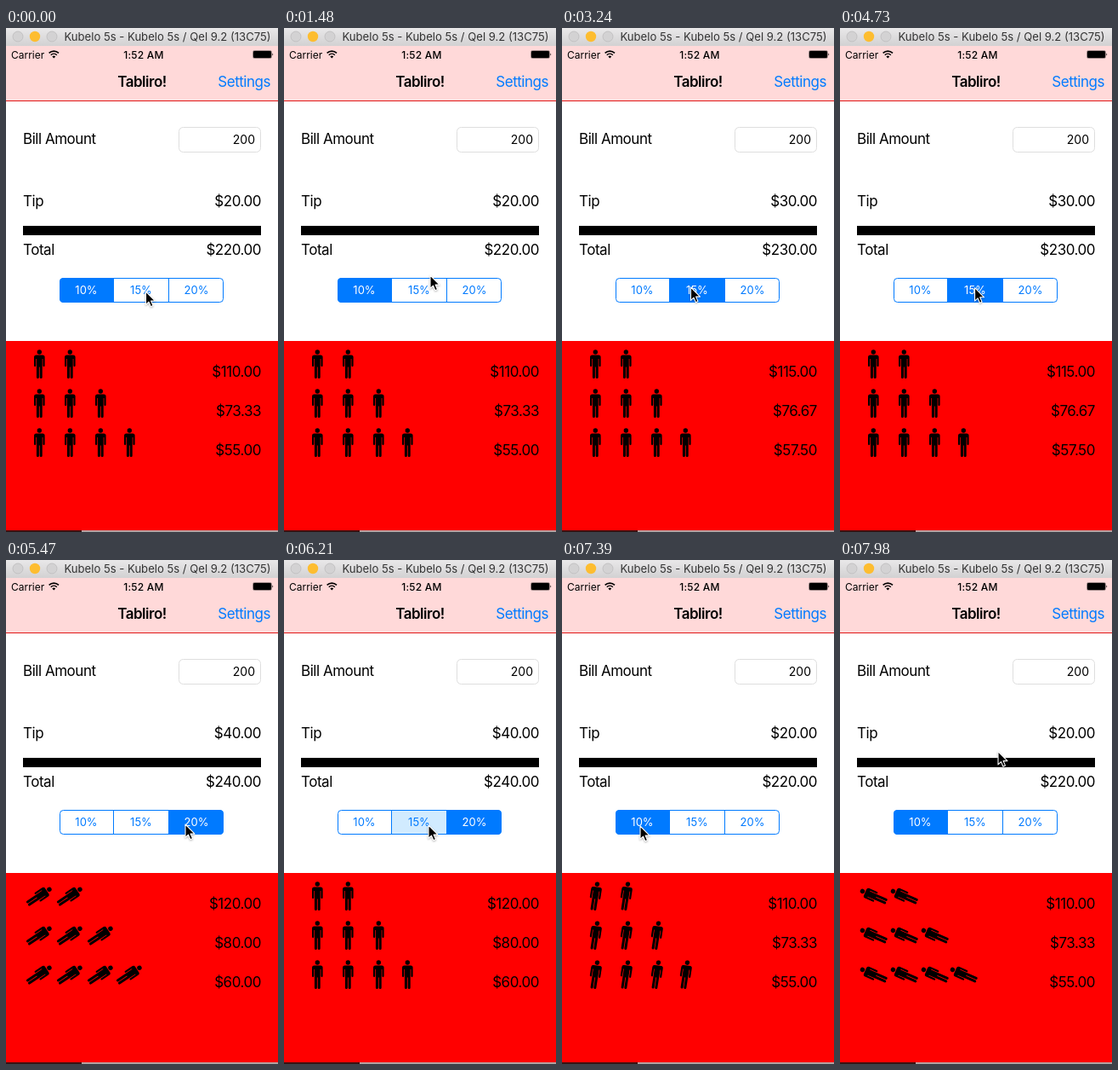
An HTML page for the animation above (8 s loop, 320 px wide and 591 px high).

```html
<!DOCTYPE html>
<html lang="en">
<head>
<meta charset="utf-8">
<title>Tip calculator</title>
<style>
html, body { margin: 0; width: 100%; height: 100%; overflow: hidden; background: #fff; }
svg { display: block; width: 100%; height: 100%; font-family: Inter, Roboto, sans-serif; }
.label { font-size: 17px; letter-spacing: -.47px; }
.seg { font-size: 13px; text-anchor: middle; }
.end { text-anchor: end; }
.mid { text-anchor: middle; }
#cursor { filter: drop-shadow(0 1px 1px rgba(0, 0, 0, .3)); }
</style>
</head>
<body>
<svg viewBox="0 0 320 591">
  <defs>
    <linearGradient id="chrome" x2="0" y2="1">
      <stop stop-color="#e9e8e9"/><stop offset="1" stop-color="#d2d1d2"/>
    </linearGradient>
    <clipPath id="pill"><rect x="63" y="293" width="193" height="29" rx="4.5"/></clipPath>
    <g id="person">
      <circle cy="-14" r="2.7"/>
      <path d="M-3.8-10.6H3.8Q6.3-10.6 6.3-8V1.8Q6.3 3.2 5.2 3.2T4.1 1.8V-6H3.4V15.4Q3.4 17 1.9 17T.4 15.4V3.4H-.4V15.4Q-.4 17-1.9 17T-3.4 15.4V-6H-4.1V1.8Q-4.1 3.2-5.2 3.2T-6.3 1.8V-8Q-6.3-10.6-3.8-10.6Z"/>
    </g>
  </defs>

  <rect width="320" height="591" fill="#fff"/>
  <rect width="320" height="21" fill="url(#chrome)"/>
  <circle cx="14" cy="10" r="6" fill="#d3d2d3" stroke="#bdbcbd" stroke-width=".8"/>
  <circle cx="34" cy="10" r="6.2" fill="#fdbd30"/>
  <circle cx="54" cy="10" r="6" fill="#d3d2d3" stroke="#bdbcbd" stroke-width=".8"/>
  <text x="68.5" y="15" font-size="13.1" fill="#333">Kubelo 5s - Kubelo 5s / Qel 9.2 (13C75)</text>

  <rect y="21" width="320" height="64" fill="#ffd9d9"/>
  <rect y="85" width="320" height="1" fill="#e01818"/>
  <text x="6" y="35.5" font-size="12">Carrier</text>
  <g fill="none" stroke="#000" stroke-width="1.6">
    <path d="M50.6 29.4a8.2 8.2 0 0 1 11.4 0M52.8 31.7a5 5 0 0 1 7 0"/>
    <path d="M56.3 35.5l-1.9-2a2.8 2.8 0 0 1 3.8 0z" fill="#000" stroke="none"/>
  </g>
  <text x="162" y="35.5" font-size="12" font-weight="500" letter-spacing=".2" class="mid">1:52 AM</text>
  <rect x="290.5" y="26.5" width="22" height="9" rx="1.8" fill="none" stroke="#8a7676" stroke-width=".8"/>
  <rect x="291" y="27" width="21" height="8" rx="1"/>
  <path d="M313.4 29.5q1.8 1.5 0 3z"/>
  <text x="160" y="69" class="label mid" font-weight="600">Tabliro!</text>
  <text x="311" y="69" class="label end" fill="#007aff">Settings</text>

  <text x="20" y="136" class="label">Bill Amount</text>
  <rect x="203.5" y="116.5" width="96" height="29" rx="5" fill="#fff" stroke="#dedede"/>
  <text x="293" y="136" font-size="14" class="end">200</text>
  <text x="20" y="209" class="label">Tip</text>
  <text x="300" y="209" class="label end" id="tip"></text>
  <rect x="20" y="232" width="280" height="11"/>
  <text x="20" y="265.5" class="label">Total</text>
  <text x="300" y="265.5" class="label end" id="total"></text>

  <g id="segments" clip-path="url(#pill)"></g>
  <path d="M126.5 293V322M191.5 293V322" stroke="#007aff"/>
  <rect x="63.5" y="293.5" width="192" height="28" rx="4" fill="none" stroke="#007aff"/>
  <g id="names"></g>

  <rect y="367" width="320" height="222" fill="#f00"/>
  <rect y="589" width="320" height="2" fill="#b5a0a0"/>
  <rect y="589" width="89" height="2" fill="#3a1212"/>
  <g id="rows"></g>

  <path id="cursor" d="M0 0V15.4L3.5 12.1 5.9 17.7 8.5 16.6 6.1 11.1H11Z" stroke="#fff" stroke-width="1.1" stroke-linejoin="round"/>
</svg>
<script>
const NS = 'http://www.w3.org/2000/svg';
const $ = id => document.getElementById(id);
const LOOP = 8000, BILL = 200;
const CAPTURE = 147.8, LEAD = 12;   // screen is sampled at a fixed rate
const RATES = [.10, .15, .20];

// [press time, release time, segment]
const TAPS = [[2050, 2184, 1], [4990, 5194, 2], [6180, 6373, 1], [7200, 7279, 0]];

// [time, x, y] of the pointer tip
const PATH = [
  [0, 164.5, 309], [70, 164.5, 309], [590, 276, 150], [960, 276, 150],
  [1480, 172, 290], [1760, 110, 323], [2060, 151.5, 304],
  [4650, 151.5, 304], [5020, 211, 310], [5560, 211, 310],
  [6150, 170, 311], [6440, 170, 311], [6930, 92, 312],
  [7400, 92, 312], [7980, 186, 224.5], [LOOP, 186, 224.5]
];

function add(parent, tag, attrs) {
  const el = document.createElementNS(NS, tag);
  for (const k in attrs) el.setAttribute(k, attrs[k]);
  return parent.appendChild(el);
}

const segs = [[63, 64, 94.5], [127, 64.5, 159], [191.5, 64.5, 224]].map(([x, width, mid], i) => {
  const box = add($('segments'), 'rect', { x, y: 293, width, height: 29 });
  const name = add($('names'), 'text', { x: mid, y: 312, class: 'seg' });
  name.textContent = Math.round(RATES[i] * 100) + '%';
  return { box, name };
});

const people = [], shares = [];
for (let n = 2; n <= 4; n++) {
  const y = 394 + (n - 2) * 46;
  for (let i = 0; i < n; i++) {
    people.push({ x: i < 3 ? 39.3 + i * 36 : 145.3, y, el: add($('rows'), 'use', { href: '#person' }) });
  }
  shares.push({ n, el: add($('rows'), 'text', { x: 300, y: y + 14.5, class: 'label end' }) });
}

const money = v => '$' + v.toFixed(2);
const smooth = p => p * p * (3 - 2 * p);

// cubic-bezier(.42, 0, .58, 1)
function easeInOut(p) {
  if (p <= 0 || p >= 1) return p <= 0 ? 0 : 1;
  let lo = 0, hi = 1;
  for (let i = 0; i < 24; i++) {
    const s = (lo + hi) / 2, r = 1 - s;
    if (1.26 * s * r * r + 1.74 * s * s * r + s * s * s < p) lo = s; else hi = s;
  }
  return smooth(lo);
}

function pointer(t) {
  const i = Math.max(1, PATH.findIndex(k => k[0] >= t));
  const [t0, x0, y0] = PATH[i - 1], [t1, x1, y1] = PATH[i];
  const p = smooth((t - t0) / (t1 - t0));
  return [x0 + (x1 - x0) * p, y0 + (y1 - y0) * p];
}

function draw(now) {
  const t = Math.floor((now % LOOP + LEAD) / CAPTURE) * CAPTURE;
  let chosen = 0, pressed = -1, angle = 0;
  for (const [down, up, seg] of TAPS) {
    if (t >= down && t < up) pressed = seg;
    if (t >= up) {
      chosen = seg;
      angle = 360 * easeInOut((t - up) / 1000);
    }
  }

  segs.forEach(({ box, name }, i) => {
    const on = i === chosen;
    box.setAttribute('fill', on ? '#007aff' : i === pressed ? '#d1ebff' : '#fff');
    name.setAttribute('fill', on ? '#fff' : '#007aff');
  });

  const tip = BILL * RATES[chosen];
  $('tip').textContent = money(tip);
  $('total').textContent = money(BILL + tip);
  for (const { n, el } of shares) el.textContent = money((BILL + tip) / n);
  for (const { x, y, el } of people) el.setAttribute('transform', `translate(${x} ${y}) rotate(${angle})`);
  $('cursor').setAttribute('transform', `translate(${pointer(t)})`);
}

const start = performance.now();
function tick() {
  draw(performance.now() - start);
  requestAnimationFrame(tick);
}
tick();
</script>
</body>
</html>
```
